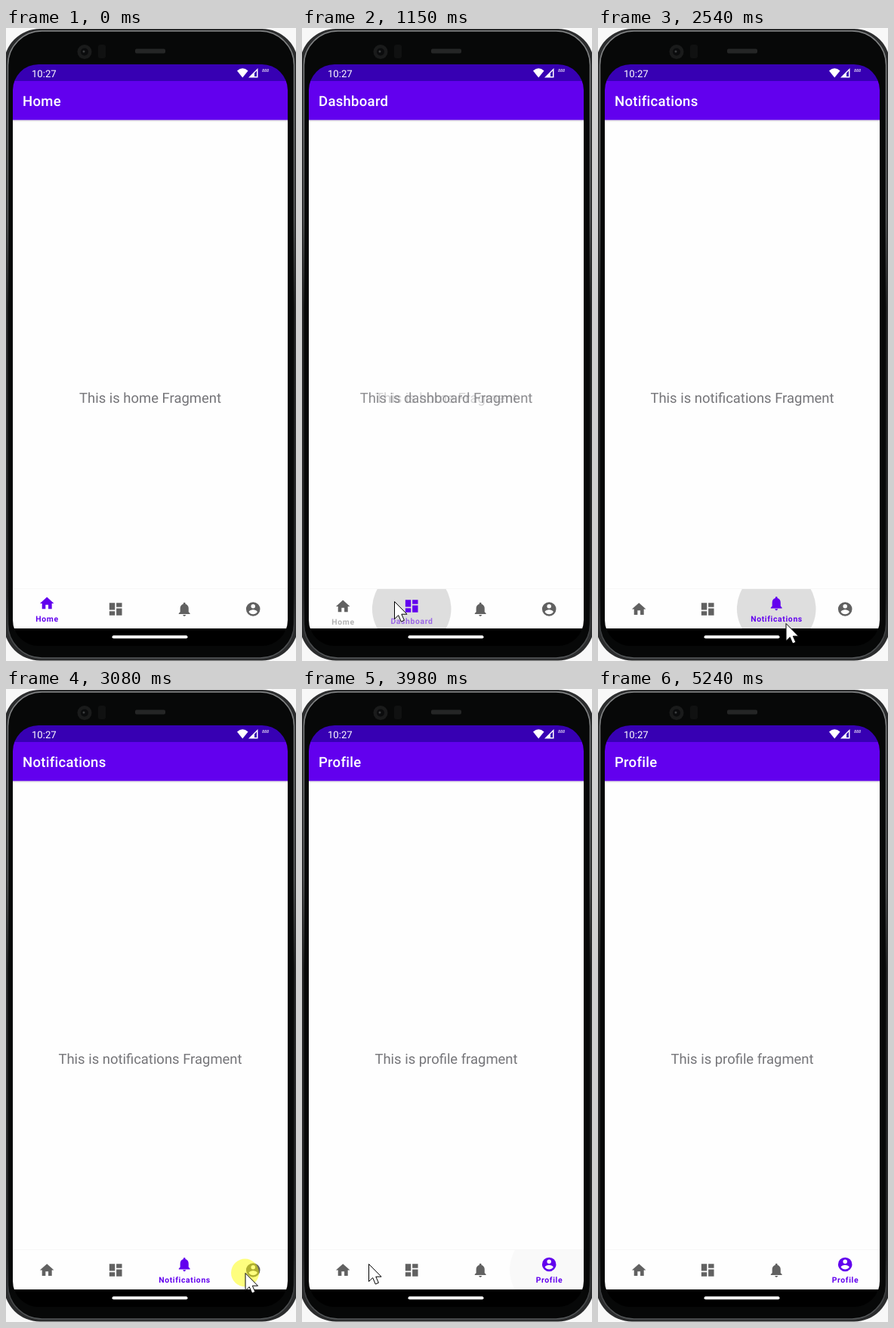
An HTML page that plays this animation: 384x836 px, repeating every 6.21 s.

```html
<!DOCTYPE html>
<html lang="en">
<head>
<meta charset="utf-8">
<title>Bottom navigation</title>
<style>
  html, body { margin: 0; width: 100%; height: 100%; overflow: hidden; background: #f8f8f8; }
  svg { display: block; width: 384px; height: 836px; font-family: Roboto, sans-serif; text-rendering: geometricPrecision; }
  .title { font-size: 18.54px; font-weight: 500; letter-spacing: .27px; fill: #fff; }
  .clock { font-size: 13.1px; fill: #fff; }
  .body { font-size: 18.46px; fill: #757579; text-anchor: middle; }
  .label { font-size: 10.4px; font-weight: 700; letter-spacing: .65px; text-anchor: middle; }
</style>
</head>
<body>
<svg viewBox="0 0 384 836">
  <defs>
    <linearGradient id="rim" x2="0" y2="1">
      <stop offset="0" stop-color="#858788"/>
      <stop offset=".3" stop-color="#5c5e5f"/>
      <stop offset=".44" stop-color="#151616"/>
      <stop offset=".9" stop-color="#1d1e1f"/>
      <stop offset="1" stop-color="#55585a"/>
    </linearGradient>
    <linearGradient id="shade" x2="0" y2="1">
      <stop offset="0" stop-opacity=".13"/>
      <stop offset="1" stop-opacity="0"/>
    </linearGradient>
    <clipPath id="screen"><rect x="9" y="48" width="364" height="768" rx="34"/></clipPath>
    <clipPath id="navBar"><rect x="9" y="741" width="364" height="52"/></clipPath>
  </defs>

  <!-- phone body -->
  <rect x="-3" y="1" width="390" height="834.500" rx="48" fill="#2b2c2d"/>
  <rect x="2.500" y="4" width="379" height="828" rx="45" fill="#070808" stroke="url(#rim)" stroke-width="1.500"/>
  <circle cx="104" cy="31.500" r="9.500" fill="#1a1b1b"/>
  <circle cx="104" cy="31.500" r="5" fill="#0b0c0d"/>
  <circle cx="103" cy="31" r="1.500" fill="#3b3d3f"/>
  <rect x="122" y="22" width="10" height="18" rx="3" fill="#101111"/>
  <rect x="171" y="27.500" width="40" height="6" rx="2" fill="#252626"/>

  <g clip-path="url(#screen)">
    <rect x="9" y="48" width="364" height="768"/>
    <rect x="9" y="121" width="364" height="672" fill="#fefefe"/>
    <rect x="9" y="48" width="364" height="22" fill="#3700b3"/>
    <rect x="9" y="70" width="364" height="51.500" fill="#6200ee"/>
    <rect x="9" y="121.500" width="364" height="3" fill="url(#shade)"/>
    <text class="clock" x="34" y="64.800">10:27</text>
    <g fill="#fff">
      <path d="M313.200 65.500 306 56.500Q313.200 50 320.500 56.500Z"/>
      <path fill-rule="evenodd" d="M321 65.500 333.500 53V65.500ZM329 59.500V64H332V56.500Z"/>
      <text x="339" y="58" font-size="5.500" font-style="italic" font-weight="500" opacity=".85">888</text>
    </g>
    <text id="title" class="title" x="22" y="103"></text>
    <text id="oldBody" class="body" x="191" y="495"></text>
    <text id="newBody" class="body" x="191" y="495"></text>
    <rect x="9" y="740" width="364" height="1" fill="#f7f7f7"/>
    <g clip-path="url(#navBar)">
      <circle id="ripple" cy="767"/>
      <g id="tabs"></g>
    </g>
  </g>
  <rect x="140.500" y="802.300" width="100" height="4" rx="2" fill="#fff"/>

  <circle id="press" r="18.500" fill="#ff0" fill-opacity=".5"/>
  <path id="cursor" d="M.5.5V23.500L5.700 18.600 9.300 27 13.400 25.200 9.800 17.200H17Z" fill="#fff" stroke="#000"/>
</svg>

<script>
const LOOP = 6210;
const TABS = [
  { name: 'Home', body: 'This is home Fragment', icon: 'M10 20v-6h4v6h5v-8h3L12 3 2 12h3v8z' },
  { name: 'Dashboard', body: 'This is dashboard Fragment',
    icon: 'M3 13h8V3H3v10zm0 8h8v-6H3v6zm10 0h8V11h-8v10zm0-18v6h8V3h-8z' },
  { name: 'Notifications', body: 'This is notifications Fragment',
    icon: 'M12 22c1.1 0 2-.9 2-2h-4c0 1.1.9 2 2 2zm6-6v-5c0-3.070-1.640-5.640-4.500-6.320V4a1.500 1.500 0 0 0-3 0v.68C7.630 5.360 6 7.920 6 11v5l-2 2v1h16v-1z' },
  { name: 'Profile', body: 'This is profile fragment',
    icon: 'M12 2a10 10 0 1 0 0 20 10 10 0 0 0 0-20zm0 3a3 3 0 1 1 0 6 3 3 0 0 1 0-6zm0 14.200c-2.500 0-4.710-1.280-6-3.220.03-1.990 4-3.080 6-3.080s5.970 1.090 6 3.080c-1.290 1.940-3.500 3.220-6 3.220z' }
];
// Tab shown from each moment on; "cut" entries appear without a transition.
const VISITS = [
  { at: 0, tab: 0, cut: true }, { at: 1020, tab: 1 }, { at: 2120, tab: 2 },
  { at: 3290, tab: 3 }, { at: 4620, tab: 0 }, { at: 5240, tab: 3, cut: true }
];
const PRESSES = [[740, 1020], [1830, 2120], [3080, 3290], [4410, 4620]];
// Pointer path: time, x, y
const PATH = [
  [120, 165, 840], [540, 122, 757], [1620, 122, 757], [1830, 248.5, 786], [2680, 248.5, 786],
  [3010, 316.5, 771], [3910, 316.5, 771], [3980, 88, 759], [4120, 60, 764], [4270, 60, 764], [4340, 53, 767]
];

const $ = id => document.getElementById(id);
const set = (el, attrs) => { for (const key in attrs) el.setAttribute(key, attrs[key]); };
const clamp = v => Math.max(0, Math.min(1, v));
const snap = (v, step) => Math.floor(v / step) * step;
const tabX = i => 54.2 + 91 * i;

$('tabs').innerHTML = TABS.map(tab =>
  `<g><path fill-rule="evenodd" d="${tab.icon}"/><text class="label">${tab.name}</text></g>`).join('');
const tabEls = [...$('tabs').children];

function pointerAt(t) {
  const next = PATH.findIndex(p => p[0] > t);
  if (next === 0) return PATH[0].slice(1);
  if (next < 0) return PATH.at(-1).slice(1);
  const [t0, x0, y0] = PATH[next - 1], [t1, x1, y1] = PATH[next];
  const k = snap(t - t0, 70) / (t1 - t0);
  return [x0 + (x1 - x0) * k, y0 + (y1 - y0) * k];
}

function drawTab(el, i, lift, selected) {
  const [icon, label] = el.children;
  const x = tabX(i), drop = 7.6 * (1 - lift), fill = selected ? '#6200ee' : '#616161';
  set(icon, { fill, transform: `translate(${x - 11.12} ${759.9 + drop - 11.12}) scale(.927)` });
  set(label, { fill, x: x + .3, y: 783.7 + drop, opacity: lift });
}

function render(t) {
  const index = VISITS.findLastIndex(v => v.at <= t);
  const visit = VISITS[index], tab = visit.tab;
  const previous = visit.cut ? -1 : VISITS[index - 1].tab;
  const age = visit.cut ? Infinity : snap(t - visit.at, 65);

  $('title').textContent = TABS[tab].name;
  $('newBody').textContent = TABS[tab].body;
  $('oldBody').textContent = previous < 0 ? '' : TABS[previous].body;
  set($('newBody'), { opacity: 1 - (1 - clamp(age / 220)) ** 2 });
  set($('oldBody'), { opacity: 1 - clamp(age / 190) });

  const p = clamp(age / 250), lift = p * p * (3 - 2 * p);
  tabEls.forEach((el, i) => drawTab(el, i, i === tab ? lift : i === previous ? 1 - lift : 0, i === tab));

  set($('ripple'), {
    cx: tabX(tab),
    r: 20 + 32.3 * clamp(age / 130),
    'fill-opacity': .125 * clamp((690 - age) / 240)
  });

  const [x, y] = pointerAt(t), at = `translate(${x} ${y})`;
  const visible = t < 5240;
  const pressed = PRESSES.some(([down, up]) => t >= down && t < up);
  set($('cursor'), { transform: at, visibility: visible ? 'visible' : 'hidden' });
  set($('press'), { transform: at, visibility: pressed ? 'visible' : 'hidden' });
}

const start = performance.now();
function frame() {
  render((performance.now() - start) % LOOP);
  requestAnimationFrame(frame);
}
frame();
</script>
</body>
</html>
```
